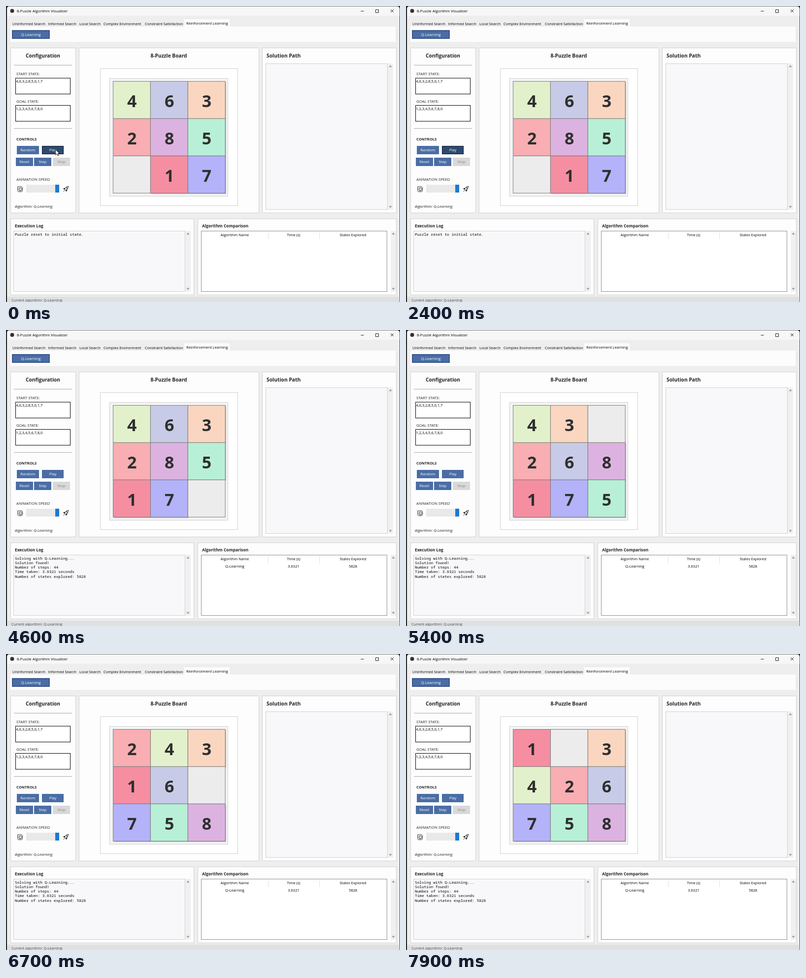
Write an HTML page that moves like this. It is 800x603 px and loops after 8000 ms.

```html
<!DOCTYPE html>
<html lang="en">
<head>
<meta charset="utf-8">
<title>8-Puzzle</title>
<style>
  html, body { margin: 0; width: 100%; height: 100%; overflow: hidden; background: #222; }
  svg { display: block; width: 800px; height: 603px; font-family: "Open Sans", "Noto Sans", sans-serif; }
  text { white-space: pre; }
  .mono { font-family: "Noto Sans Mono", "DejaVu Sans Mono", monospace; }
</style>
</head>
<body>
<svg id="stage" viewBox="0 0 800 603"></svg>
<script>
const stage = document.getElementById("stage");

const rect = (x, y, w, h, fill, stroke, extra = "") =>
  `<rect x="${x}" y="${y}" width="${w}" height="${h}" fill="${fill}" ${stroke ? `stroke="${stroke}"` : ""} ${extra}/>`;
const path = (d, stroke, fill = "none", extra = "") =>
  `<path d="${d}" stroke="${stroke}" fill="${fill}" ${extra}/>`;
const text = (x, y, s, size = 7.6, fill = "#000", extra = "") =>
  `<text x="${x}" y="${y}" font-size="${size}" fill="${fill}" ${extra}>${s}</text>`;
const MID = ' text-anchor="middle"', BOLD = ' font-weight="700"';

const panel = (x, y, w, h) => rect(x + .5, y + .5, w, h, "#fdfdfd", "#d2d2d2");
const button = (x, y, w, h, label, fill = "#4a6da5", ink = "#fff", edge = fill) =>
  rect(x + .5, y + .5, w - 1, h - 1, fill, edge) + text(x + w / 2, y + h / 2 + 2.6, label, 7.7, ink, MID);
const scrollbar = (x, y, h) => {
  const c = x + 5.5, b = y + h;
  return rect(x, y, 11, h, "#f0f0f0") +
    path(`M${c - 3} ${y + 7.5}l3 -4l3 4zM${c - 3} ${b - 7.5}l3 4l3 -4z`, "none", "#999");
};

function frameWindow() {
  return rect(0, 0, 800, 603, "#222") +
    rect(2, .8, 797.2, 620, "#eeeeee", "", 'rx="5"') +
    path("M2 20V6Q2 .8 7 .8H794Q799.2 .8 799.2 6V20z", "none", "#f7f7f8") +
    '<circle cx="12.5" cy="10" r="4" fill="#333"/>' +
    text(22, 13, "8-Puzzle Algorithm Visualizer", 7.7) +
    path("M720.5 10.5h6M750.5 7.5h6v6h-6zM781 7l6 6m0 -6l-6 6", "#222");
}

function tabs() {
  const labels = [[13, "Uninformed Search"], [85.5, "Informed Search"], [149, "Local Search"],
    [198, "Complex Environment"], [282, "Constraint Satisfaction"]];
  return rect(9, 42, 782, 31, "#fcfcfc") + rect(362, 27, 92, 16, "#fcfcfc") +
    labels.map(([x, s]) => text(x, 39, s, 7.4)).join("") +
    text(366, 38, "Reinforcement Learning", 7.55) +
    button(12, 49, 77, 18, "Q-Learning") +
    rect(13.5, 50.5, 74, 15, "none", "#2f4a76");
}

function config() {
  const rule = y => path(`M16 ${y}H134`, "#a8a8a8");
  const field = (y, s) => rect(19.5, y, 111, 32.3, "#fff", "#111", 'stroke-width="1.1"') +
    text(20.3, y + 9.3, s, 7.6);
  const snail = rect(23.5, 368, 10, 10.5, "#fff", "#333", 'rx="3"') +
    '<circle cx="29" cy="373.5" r="3.2" fill="none" stroke="#333"/>' +
    path("M22.500 367.500l2.500 2M30.500 374.500a1.500 1.500 0 1 1 -1 -2", "#444", "none", 'stroke-width=".8"');
  const rocket = path("M119 373q2 -5 8 -6q-.5 6 -6 8.500z", "#222", "#fff") +
    path("M120 371l-3.500 1l2 1.500zM122 375l0 3l2.500 -4z", "#222", "#222") +
    path("M119.500 375l-3 3", "#222") + '<circle cx="123.600" cy="370.700" r="1.200" fill="#222"/>';
  return panel(9, 85, 132, 336) +
    text(75, 105.4, "Configuration", 10.2, "#222", MID + BOLD) +
    rule(120.5) +
    text(21, 141.2, "START STATE:", 7.8, "#222") + field(147, "4,6,3,2,8,5,0,1,7") +
    text(21, 197.2, "GOAL STATE:", 7.8, "#222") + field(202.5, "1,2,3,4,5,6,7,8,0") +
    rule(249.5) +
    text(21, 274, "CONTROLS", 7.7, "#222", BOLD) +
    button(22, 285, 45, 17, "Random") + '<g id="play"></g>' +
    button(20, 309, 35, 17, "Reset") + button(57, 309, 35, 17, "Step") +
    button(95, 309, 35, 17, "Stop", "#d9d9d9", "#858585") +
    text(21, 355.6, "ANIMATION SPEED", 7.8, "#222") +
    snail + rocket +
    rect(41, 364, 67, 16, "#e9e9e9") + rect(100, 364, 8, 16, "#1a7ad4") +
    text(18, 411, "Algorithm: Q-Learning", 7.9, "#222", 'font-style="italic"');
}

function mainPanels() {
  return panel(148, 85, 365, 336) +
    text(330.5, 105.4, "8-Puzzle Board", 10.2, "#222", MID + BOLD) +
    rect(191.5, 127.5, 279, 279, "#fff", "#cfcfcf") +
    rect(210.5, 147.5, 240, 240, "#f4f4f6", "#cfcfcf") + '<g id="board"></g>' +
    panel(520, 85, 272, 336) +
    text(529, 105.4, "Solution Path", 10.3, "#222", BOLD) +
    rect(527.5, 117.5, 247, 297, "#f8f8fa", "#d0d0d0") + scrollbar(775, 117, 298) +
    panel(9, 433, 372, 155) +
    text(18, 451, "Execution Log", 8.4, "#222", BOLD) +
    rect(15.5, 458.5, 348, 123, "#f8f8fa", "#d0d0d0") + scrollbar(364, 458, 124) +
    '<g id="log" class="mono"></g>' +
    panel(389, 433, 403, 155) +
    text(398, 451, "Algorithm Comparison", 8.35, "#222", BOLD) +
    rect(396.5, 458.5, 377, 123, "#fff", "#8c8f94") + scrollbar(781, 458, 124) +
    path("M532.5 460V475M636.5 460V475", "#e0e0e0") +
    row(469.2, ["Algorithm Name", "Time (s)", "States Explored"]) + '<g id="result"></g>' +
    rect(2, 592, 797.2, 11, "#e0e0e0") +
    text(11, 602, "Current algorithm: Q-Learning", 7.35, "#444");
}

const row = (y, cells) => cells.map((s, i) => text([464.5, 584, 704.5][i], y, s, 7.5, "#000", MID)).join("");

stage.innerHTML = frameWindow() + tabs() + config() + mainPanels() +
  path("M100.500 292.500v11l2.600 -2.300l1.900 4l2 -1l-1.900 -3.800h3.400z", "#111", "#fff", 'id="cursor" stroke-width=".9"');

const LOOP = 8000, CURSOR_GONE = 500, SOLVED = 4100, STEP = 200;
const START = [4, 6, 3, 2, 8, 5, 0, 1, 7];
// Cells the blank visits, one per step.
const ROUTE = [7, 8, 5, 4, 1, 2, 1, 0, 3, 6, 7, 8, 5, 4, 1, 0, 3, 4, 1];
const COLORS = ["#ececec", "#f58ea1", "#f8aeb2", "#fad6c0", "#e2f1cb", "#b7f0d6", "#c8cbe7", "#b4b2f9", "#dcb3e0"];
const IDLE_LOG = ["Puzzle reset to initial state."];
const DONE_LOG = ["Solving with Q-Learning...", "Solution found!", "Number of steps: 44",
  "Time taken: 3.6321 seconds", "Number of states explored: 5828"];

const [play, board, log, result, cursor] =
  ["play", "board", "log", "result", "cursor"].map(id => document.getElementById(id));

function boardAfter(steps) {
  const cells = [...START];
  let blank = cells.indexOf(0);
  for (const next of ROUTE.slice(0, steps)) {
    cells[blank] = cells[next];
    cells[next] = 0;
    blank = next;
  }
  return cells;
}

function tile(n, i) {
  const x = 217.5 + i % 3 * 75.9, y = 153.5 + Math.floor(i / 3) * 75.9;
  return (n ? rect(x + 1.5, y + 1.5, 75.9, 75.9, "#a8a8a8") : "") +
    rect(x, y, 75.9, 75.9, COLORS[n], "#7c7c7c") +
    (n ? text(x + 38.2, y + 52.3, n, 34, "#2f2f2f", MID + BOLD) : "");
}

let shown = "";
function draw() {
  const t = performance.now() % LOOP;
  const solved = t >= SOLVED, steps = solved ? Math.floor((t - SOLVED) / STEP) : 0;
  cursor.style.display = t < CURSOR_GONE ? "" : "none";
  const key = solved + ":" + steps;
  if (key !== shown) {
    shown = key;
    board.innerHTML = boardAfter(steps).map(tile).join("");
    play.innerHTML = solved ? button(73, 285, 44, 17, "Play")
      : button(73, 285, 44, 17, "Play", "#2c4a70", "#fff", "#0c1420");
    log.innerHTML = (solved ? DONE_LOG : IDLE_LOG)
      .map((s, i) => text(18, 467.7 + i * 9.25, s, 7.75)).join("");
    result.innerHTML = solved ? row(484, ["Q-Learning", "3.6321", "5828"]) : "";
  }
  requestAnimationFrame(draw);
}
draw();
</script>
</body>
</html>
```
